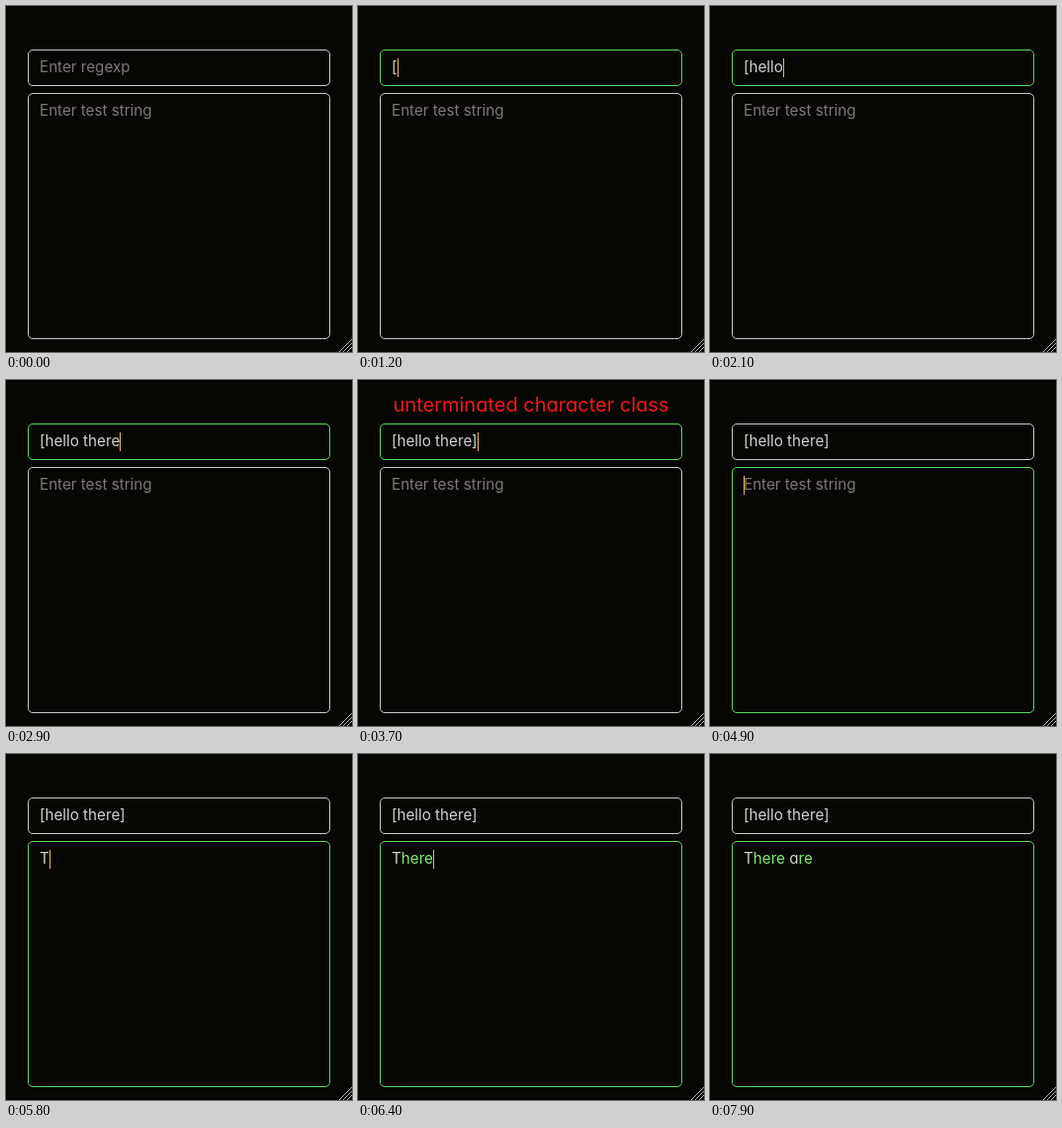
Animation of 350 by 350 pixels, one loop 8000 ms. Source, as an HTML page:

```html
<!DOCTYPE html>
<html lang="en">
<head>
<meta charset="utf-8">
<style>
  html, body { margin: 0; width: 100%; height: 100%; overflow: hidden; background: #060602; }
  #stage {
    position: relative; width: 350px; height: 350px; overflow: hidden;
    font: 15.2px/19px Inter, sans-serif; font-feature-settings: "cv11"; white-space: pre;
  }
  #error {
    position: absolute; top: 13px; width: 100%; text-align: center;
    font-size: 20px; line-height: 24px; color: #f01a14;
  }
  .field {
    position: absolute; left: 22px; width: 306px; box-sizing: border-box;
    padding: 7px 11px; border: 1px solid #c8c8c2; border-radius: 5px;
  }
  .focus { border-color: #58d858; }
  #regexp { top: 44px; height: 37px; }
  #sample { top: 88px; height: 249px; }
  .typed { color: #d6d0d6; }
  .typed b { font-weight: inherit; color: #7cf06c; }
  .hint { color: #81777b; }
  .caret { position: absolute; top: 8px; width: 1px; height: 19px; background: #e8c044; }
  svg { position: absolute; right: 0; bottom: 0; stroke: #b4b4b0; }
</style>
</head>
<body>
<div id="stage">
  <div id="error">unterminated character class</div>
  <div id="regexp" class="field"><span class="typed"></span><i class="caret"></i><span class="hint">Enter regexp</span></div>
  <div id="sample" class="field"><span class="typed"></span><i class="caret"></i><span class="hint">Enter test string</span></div>
  <svg width="14" height="14"><path d="M1 14L14 1M5 14L14 5M9 14L14 9"/></svg>
</div>
<script>
const LOOP = 8000;
const PATTERN = "[hello there]";
const SAMPLE = "There are ";

// Each entry is [start time, value]
const patternLength = [[0, 0], [1200, 1], [1500, 2], [1600, 3], [1800, 4], [1900, 5], [2100, 6],
  [2300, 7], [2400, 8], [2600, 9], [2700, 10], [2900, 12], [3700, 13]];
const sampleLength = [[0, 0], [5800, 1], [5900, 2], [6000, 4], [6100, 5], [6500, 6], [6600, 7],
  [6900, 9], [7400, 10]];
const matchedLength = [[0, 0], [6400, 5], [7400, 10]];
const focused = [[0, ""], [500, "regexp"], [4900, "sample"]];
const caretOn = [[0, false], [500, true], [1100, false], [1200, true], [3400, false], [3700, true],
  [4300, false], [4900, true], [5400, false], [5800, true], [7900, false]];
const errorOn = [[0, false], [3200, true], [4300, false]];

const valueAt = (track, t) => track.findLast(([start]) => start <= t)[1];
const show = (element, on) => { element.style.visibility = on ? "visible" : "hidden"; };

function drawField(id, html, t) {
  const field = document.getElementById(id);
  const active = valueAt(focused, t) === id;
  const typed = field.querySelector(".typed");
  field.classList.toggle("focus", active);
  if (typed.innerHTML !== html) typed.innerHTML = html;
  show(field.querySelector(".hint"), !html);
  show(field.querySelector(".caret"), active && valueAt(caretOn, t));
}

function draw(t) {
  const matched = valueAt(matchedLength, t);
  const sample = SAMPLE.slice(0, valueAt(sampleLength, t));
  const highlighted = sample.slice(0, matched).replace(/[hello there]+/g, "<b>$&</b>");
  show(document.getElementById("error"), valueAt(errorOn, t));
  drawField("regexp", PATTERN.slice(0, valueAt(patternLength, t)), t);
  drawField("sample", highlighted + sample.slice(matched), t);
}

const begin = performance.now();
function tick() {
  draw((performance.now() - begin) % LOOP);
  requestAnimationFrame(tick);
}
tick();
</script>
</body>
</html>
```
